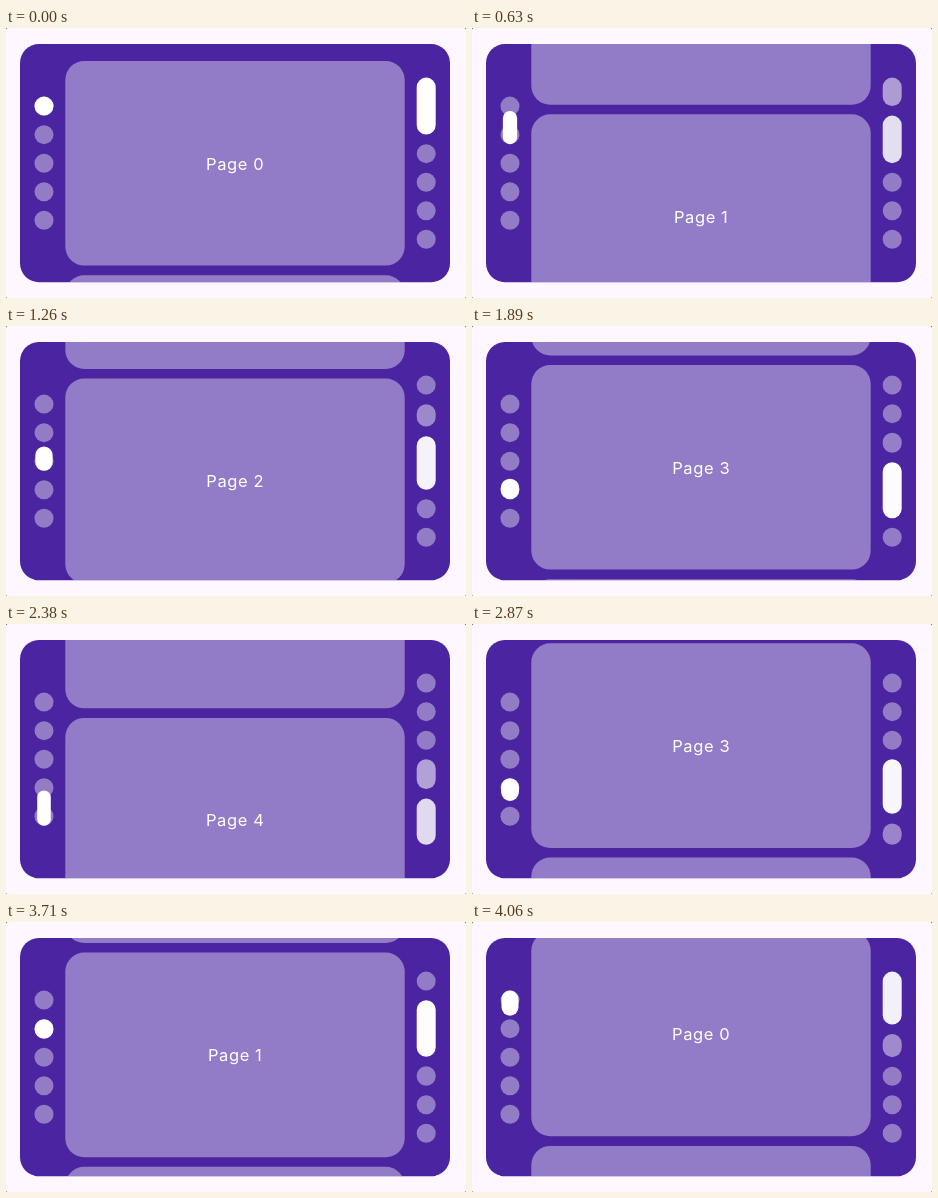
Recreate the animation shown at these times as an HTML page. Size 460x270 px, loop 4130 ms.

```html
<!DOCTYPE html>
<html lang="en">
<head>
<meta charset="utf-8">
<title>Vertical pager indicators</title>
<style>
  html, body { margin: 0; width: 100%; height: 100%; overflow: hidden; background: #222; }
  svg { display: block; width: 460px; height: 270px; }
  text { font: 16.5px Inter, sans-serif; letter-spacing: .6px; text-anchor: middle; fill: #fff; }
</style>
</head>
<body>
<svg id="stage" viewBox="0 0 460 270">
  <defs><clipPath id="clip"><rect x="14" y="16" width="430" height="238.3" rx="19"/></clipPath></defs>
  <rect width="460" height="270" rx="1.5" fill="#fef7ff"/>
  <rect x="14" y="16" width="430" height="238.3" rx="19" fill="#4b25a1"/>
</svg>
<script>
const COUNT = 5, LOOP = 4130, STEP = 70;
const DOT = 19, GAP = 9.55, PITCH = DOT + GAP;
const PAGE_TOP = 33, PAGE_H = 204.6, PAGE_PITCH = 214.2;
const RATE = 0.017;

// [start in ms, direction] of every swipe
const SWIPES = [
  [399, 1], [939, 1], [1474, 1], [2162, 1],
  [2520, -1], [2875, -1], [3223, -1], [3754, -1]
];

const stage = document.getElementById('stage');

function add(parent, tag, attrs) {
  const el = document.createElementNS('http://www.w3.org/2000/svg', tag);
  set(el, attrs);
  return parent.appendChild(el);
}

function set(el, attrs) {
  for (const name in attrs) el.setAttribute(name, attrs[name]);
}

function pill(cx, y, w, h, opacity) {
  return { x: cx - w / 2, y, width: w, height: h, rx: Math.min(w, h) / 2, 'fill-opacity': opacity };
}

const indexes = [...Array(COUNT).keys()];
const pager = add(stage, 'g', { 'clip-path': 'url(#clip)' });

const pages = indexes.map(i => {
  const g = add(pager, 'g', {});
  add(g, 'rect', { x: 59.3, width: 339.4, height: PAGE_H, rx: 19, fill: '#fff', 'fill-opacity': .4 });
  add(g, 'text', { x: 229.2, y: 108.5 }).textContent = 'Page ' + i;
  return g;
});

indexes.forEach(i => add(stage, 'rect', { ...pill(38, 68.6 + i * PITCH, DOT, DOT, .4), fill: '#fff' }));
const worm = add(stage, 'rect', { fill: '#fff' });
const bars = indexes.map(() => add(stage, 'rect', { fill: '#fff' }));

// Soft start, long settling tail
function settle(ms) {
  if (ms <= 0) return 0;
  const x = ms * RATE;
  return 1 - (1 + x + x * x / 2) * Math.exp(-x);
}

function draw(t) {
  const pos = SWIPES.reduce((sum, [start, dir]) => sum + dir * settle(t - start), 0);

  pages.forEach((g, i) =>
    set(g, { transform: `translate(0 ${PAGE_TOP + (i - pos) * PAGE_PITCH})` }));

  const off = Math.abs(pos - Math.round(pos));
  const h = DOT + 2 * PITCH * off;
  set(worm, pill(38, 78.1 + pos * PITCH - h / 2, DOT * (1 - off), h, 1));

  let y = 49.6;
  bars.forEach((bar, i) => {
    const near = Math.max(0, 1 - Math.abs(pos - i));
    const size = DOT * (1 + 2 * near);
    set(bar, pill(420.2, y, DOT, size, .4 + .6 * near));
    y += size + GAP;
  });
}

function tick() {
  const t = performance.now() % LOOP;
  draw(Math.floor(t / STEP) * STEP);
  requestAnimationFrame(tick);
}
tick();
</script>
</body>
</html>
```
